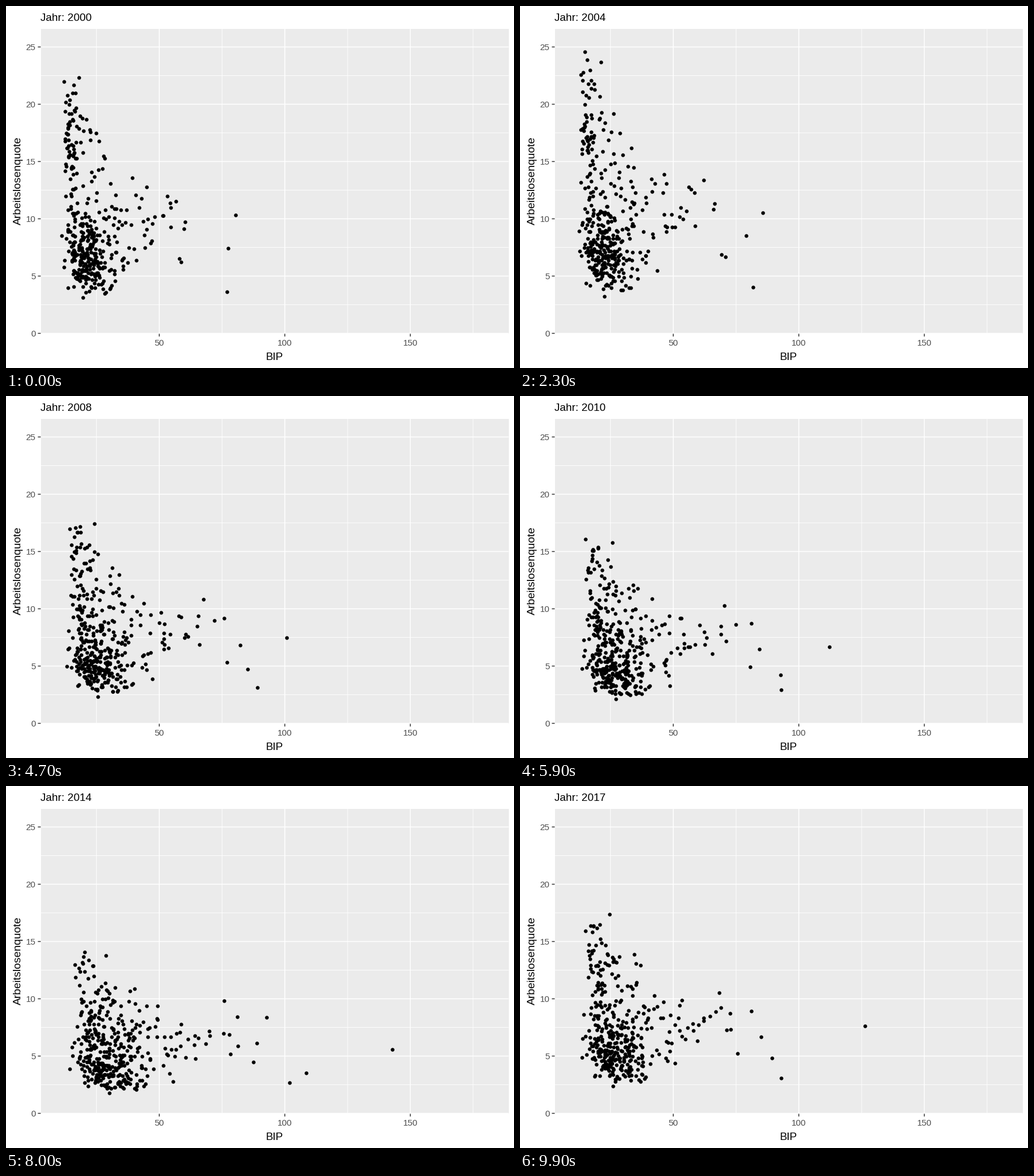
These frames come from a looping animation (885 px wide and 632 px high, 10000 ms). A matplotlib script:

```python
import numpy as np
import matplotlib.pyplot as plt
from matplotlib.animation import FuncAnimation
from matplotlib.patches import Rectangle

W, H, DPI = 885, 632, 64
FRAMES, STEP = 100, 100
YEARS = np.arange(2000, 2018)
T = (YEARS - YEARS[0]) / 17
# unemployment rises and falls again around 2005, on top of a steady decline
CYCLE = 1 + .28 * np.exp(-((YEARS - 2005) / 2) ** 2)

plt.rcParams["font.family"] = "Liberation Sans"
rng = np.random.default_rng(12)


def pt(px):
    return px * 72 / DPI


def gdp_px(v):
    return 47.8 + 4.374 * np.asarray(v)


def rate_px(v):
    return 571 - 20 * np.asarray(v)


def column(v):
    return np.asarray(v)[:, None]


# ---------- data: one row per district, one column per year ----------
def drift(n, size):
    """Random walk per district, zero in the first year."""
    steps = rng.normal(0, size, (n, len(YEARS)))
    steps[:, 0] = 0
    return np.exp(steps.cumsum(axis=1))


def develop(gdp, rate, gain, fall):
    """Grow GDP by about `gain` and shrink the rate to about `fall` of its start."""
    n = len(gdp)
    gain = gain ** rng.normal(1, .22, n)
    fall = fall * np.exp(rng.normal(0, .14, n))
    x = column(gdp) * column(gain) ** T ** 1.2 * drift(n, .012)
    y = column(rate) * column(fall) ** T * CYCLE * drift(n, .045)
    # fold stray values back between a floor and a ceiling that sinks with GDP
    common = CYCLE * .55 ** T
    low = 3.5 * common
    high = column(11 + 12 * np.exp((14 - gdp) / 18)) * common
    y = low + abs(y - low)
    y = high - abs(high - y)
    return x, y.round(1)


def east(n=82):
    gdp = np.maximum(14.6 * np.exp(rng.normal(0, .13, n)), 12 + rng.random(n))
    gdp[: n // 5] *= 1.55
    return develop(gdp, rng.normal(16.5, 3.4, n), 1.68, .48)


def west(n=225):
    dev = rng.normal(0, .2, n)
    rate = 6.5 * np.exp(-.4 * dev + rng.normal(0, .28, n))
    return develop(20.4 * np.exp(dev), rate, 1.55, .58)


def city(n=82):
    gdp = np.minimum(32 * np.exp(rng.normal(0, .29, n)), 50 + 6 * rng.random(n))
    return develop(gdp, 8.8 * np.exp(rng.normal(0, .3, n)), 1.45, .68)


# districts apart from the cloud: GDP and rate at start, at end, bend of growth
APART = [
    (80.5, 10.3, 172.4, 4.9, 2), (77, 3.6, 109, 2.5, 1.3),
    (77.4, 7.4, 92.6, 5.9, 1.5), (60.2, 9.7, 102, 8.1, 1.3),
    (58, 6.5, 120.5, 3.1, 1.1), (59.9, 9.1, 85.5, 8.3, 1),
    (58.8, 6.2, 92.2, 4.2, .8), (56.7, 11.5, 80, 9.5, 1),
    (11.2, 8.5, 16.5, 4.5, 1), (19.5, 3.1, 32.3, 1.6, 1),
    (18.1, 22.3, 31, 12.4, 1),
]


def apart(gdp, rate, gdp_end, rate_end, bend):
    return (gdp + (gdp_end - gdp) * T ** bend,
            rate * (rate_end / rate) ** T * CYCLE)


parts = [east(), west(), city()] + [apart(*row) for row in APART]
X = gdp_px(np.vstack([p[0] for p in parts]))
Y = rate_px(np.vstack([p[1] for p in parts]))

# ---------- stage ----------
fig = plt.figure(figsize=(W / DPI, H / DPI), dpi=DPI, facecolor="white")
ax = fig.add_axes([0, 0, 1, 1])
ax.set_xlim(-.5, W - .5)
ax.set_ylim(H - .5, -.5)
ax.axis("off")

LEFT, RIGHT, TOP, BOTTOM = 60, 875, 39, 571.5
ax.add_patch(Rectangle((LEFT, TOP), RIGHT - LEFT, BOTTOM - TOP, fc="#EBEBEB", lw=0))


def line(xs, ys, color, px, z):
    ax.plot(xs, ys, color=color, lw=pt(px), solid_capstyle="butt",
            snap=False, zorder=z)


def label(x, y, text, px, color="black", **kw):
    return ax.text(x, y, text, fontsize=pt(px), color=color, va="baseline", **kw)


for v in range(25, 176, 50):
    line([gdp_px(v)] * 2, [TOP, BOTTOM], "white", .9, 2)
for v in np.arange(2.5, 25, 5):
    line([LEFT, RIGHT], [rate_px(v)] * 2, "white", .9, 2)
for v in (50, 100, 150):
    x = gdp_px(v)
    line([x, x], [TOP, BOTTOM], "white", 1.5, 3)
    line([x, x], [BOTTOM, BOTTOM + 5], "#333333", 1.5, 3)
    label(x, 592.5, str(v), 15.2, "#4D4D4D", ha="center")
for v in range(0, 26, 5):
    y = rate_px(v)
    line([LEFT, RIGHT], [y, y], "white", 1.5, 3)
    line([LEFT - 5, LEFT], [y, y], "#333333", 1.5, 3)
    label(51, y + 5.5, str(v), 15.2, "#4D4D4D", ha="right")

label(467, 617.5, "BIP", 18.9, ha="center")
label(25, 305, "Arbeitslosenquote", 19.3, ha="center",
      rotation=90, rotation_mode="anchor")
title = label(60, 25, "", 18.9, ha="left")
dots = ax.scatter(X[:, 0], Y[:, 0], s=pt(6.5) ** 2, c="black", lw=0, zorder=5)


# ---------- motion ----------
def arrival(i):
    """Frame at which year number i is reached."""
    return max(0, min(6 * i - 1, 5 * i + 10))


def draw(frame):
    i = max(k for k in range(len(YEARS)) if arrival(k) <= frame)
    nxt = (i + 1) % len(YEARS)
    end = arrival(i + 1)
    steps = 3 if end <= 65 else 2
    t = max(0, frame - end + steps) / steps
    dots.set_offsets(np.column_stack([
        X[:, i] + t * (X[:, nxt] - X[:, i]),
        Y[:, i] + t * (Y[:, nxt] - Y[:, i])]))
    title.set_text(f"Jahr: {YEARS[nxt if t > .5 else i]}")
    return dots, title


anim = FuncAnimation(fig, draw, frames=FRAMES, interval=STEP,
                     repeat=True, repeat_delay=0, blit=False)
plt.show()
```
